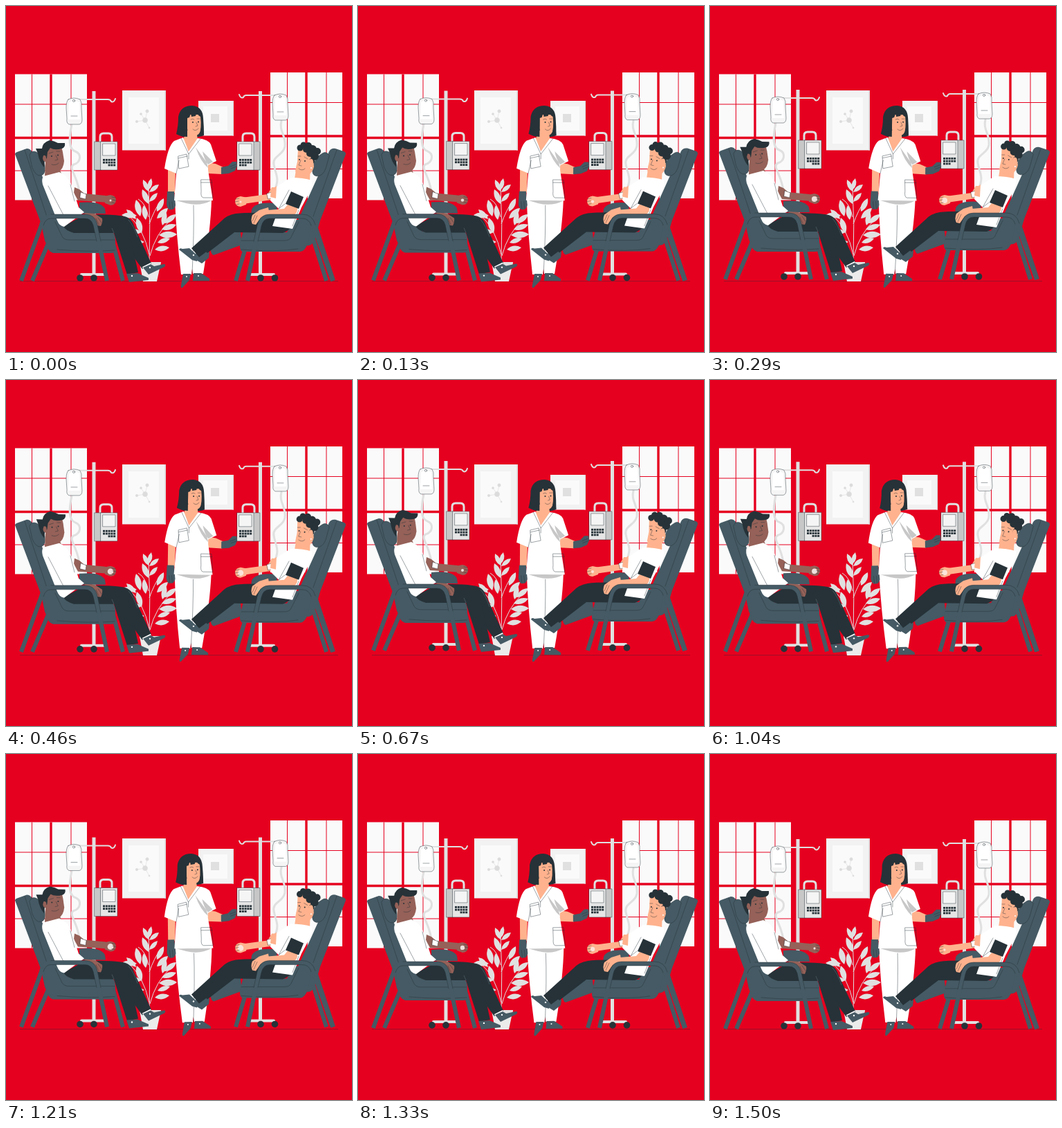
An HTML page that plays this animation: 500x500 px, repeating every 1540 ms.

```html
<!DOCTYPE html>
<html lang="en">
<head>
<meta charset="utf-8">
<title>Donation room</title>
<style>
html,body{margin:0;width:100%;height:100%;overflow:hidden;background:#e6001f}
svg{display:block;width:100%;height:100%}
.o{stroke:#263238;stroke-width:.45;stroke-linejoin:round;stroke-linecap:round}
.n{fill:none}
.w{fill:#fff}
.d{fill:#263238}
.c{fill:#455a64}
.s{fill:#ffb28d}
.b{fill:#956158}
.g{fill:#e0e0e0}
.leg{fill:none;stroke:#455a64;stroke-width:6;stroke-linejoin:round}
.pole{fill:none;stroke:#e0e0e0;stroke-linecap:round}
.post{fill:none;stroke:#e0e0e0;stroke-width:5}
</style>
</head>
<body>
<svg viewBox="0 0 500 500" xmlns="http://www.w3.org/2000/svg">
<rect width="500" height="500" fill="#e6001f"/>
<path d="M20 397.700H480" stroke="#263238" stroke-width=".4"/>
<defs>
  <g id="window">
    <rect width="104" height="182" fill="#fafafa"/>
    <path d="M52 0V182M0 92H104" stroke="#e6001f" stroke-width="3.400"/>
    <path d="M24.500 0V182M81 0V182M0 43.500H104M0 139.500H104" stroke="#e6001f"/>
  </g>
  <g id="bag">
    <path class="o" fill="#f5f5f5" d="M90 135Q98 131 107 135Q110 139 109 147L110 164Q110 170 106 171H91Q87 169 88 163L87 147Q87 138 90 135Z"/>
    <path class="w" d="M91 139Q98 135 106 139L107 164H90Z"/>
    <circle class="o n" cx="98" cy="137" r="1.600"/>
    <path class="o n" d="M94 159H103"/>
  </g>
</defs>

<use href="#window" x="13" y="98.500"/>
<use href="#window" x="382" y="96"/>

<g>
  <rect x="168" y="122" width="63" height="86.500" fill="#f2f2f2"/>
  <path d="M229 122H231V208.500H229Z" class="g"/>
  <rect x="177" y="132" width="44" height="67" fill="#fafafa"/>
  <g fill="#dcdcdc" stroke="#dcdcdc" stroke-width=".6">
    <path d="M201 165L204 152M201 165L195 156M201 165L189 167M201 165L207 176"/>
    <circle cx="201" cy="165" r="3.500"/><circle cx="204" cy="152" r="2.200"/>
    <circle cx="195" cy="156" r="1.500"/><circle cx="189" cy="167" r="1.700"/><circle cx="207" cy="176" r="1"/>
  </g>
  <rect x="278" y="137" width="51" height="50.500" fill="#f2f2f2"/>
  <path d="M327.500 137H329V187.500H327.500Z" class="g"/>
  <rect x="285" y="145" width="35" height="35" fill="#fafafa"/>
  <rect x="296" y="156" width="12" height="12" class="g"/>
</g>

<g class="bob">
  <path class="post" d="M127 123V388"/>
  <path class="pole" stroke-width="2" d="M100 135H147Q151 135 152 138Q156 140 158 134"/>
  <path class="pole" stroke-width="4" d="M109 388H143"/>
  <circle class="d" cx="107" cy="393" r="4.800"/><circle class="d" cx="127" cy="393" r="4.800"/>
  <path class="pole" stroke-width="3" d="M95 171C91 191 90 207 100 210C110 214 108 226 98 229C88 233 107 250 106 274"/>
  <use href="#bag"/>
  <path class="pole" stroke-width="3" d="M136 197V189Q136 184 141 184H148Q153 184 153 189V197"/>
  <path class="o" fill="#c7c7c7" d="M128 196H138V237H128Z"/>
  <path class="o" fill="#e6e6e6" d="M137 196H161V237H137Z"/>
  <path class="o" fill="#f5f5f5" d="M140 199H158V216H140Z"/>
  <g class="keys" data-x="140"></g>
</g>

<g class="bob">
  <path class="post" d="M367.500 123V388"/>
  <path class="pole" stroke-width="2" d="M396 129H347Q344 129 343 132Q339 134 337 128"/>
  <path class="pole" stroke-width="4" d="M352 388H387"/>
  <circle class="d" cx="368" cy="393" r="4.800"/><circle class="d" cx="388.500" cy="393" r="4.800"/>
  <path class="pole" stroke-width="3" d="M398 166C394 181 405 187 403 203C401 216 385 216 387 229C389 243 397 249 387 268"/>
  <use href="#bag" x="298" y="-6"/>
  <path class="pole" stroke-width="3" d="M342 197V189Q342 184 347 184H354Q359 184 359 189V197"/>
  <path class="o" fill="#c7c7c7" d="M357 196H367V237H357Z"/>
  <path class="o" fill="#e6e6e6" d="M334 196H358V237H334Z"/>
  <path class="o" fill="#f5f5f5" d="M337 199H355V216H337Z"/>
  <g class="keys" data-x="337"></g>
</g>

<g id="plant"></g>
<path fill="#ebebeb" d="M193 370H224L218 398H198Z"/>
<path class="g" d="M193 370H224L223 375H194Z"/>

<g id="nurse">
  <path class="w" d="M244 280H297Q296 320 285 387H270L269 380L268 388H253Q246 330 244 280Z"/>
  <path d="M246 281H297Q281 290 260 285Z" fill="#c7c7c7"/>
  <path class="o n" d="M271 288Q272 325 269 387"/>
  <path class="s" d="M234 236H245L244 270H234Z"/>
  <path class="c" d="M233 268H243L245 288Q243 295 239 294Q234 296 232 287Z"/>
  <path class="o n" d="M236 283L237 293M240 283L241 293"/>
  <path class="s" d="M290 226L303 228L314 233L312 243L292 242Z"/>
  <path class="c" d="M311 233L321 231L327 225L333 225L334 231L331 238L322 242L311 243Z"/>
  <path class="o n" d="M324 232L332 229M325 235L333 232"/>
  <path class="d" d="M249 160Q252 144 269 144Q284 145 285 162Q286 173 286 187Q280 190 263 190Q253 189 246 185Q249 174 249 160Z"/>
  <path class="s" d="M261 180H275L277 193L265 212L256 193Z"/>
  <path class="s" d="M262 157H281Q284 167 282 177Q280 188 271 188Q261 187 262 172Z"/>
  <path class="d" d="M252 165Q252 147 267 146Q284 147 284 162L286 187L279 188Q283 176 281 160L278 158L276 150L274 159L268 160L267 155L265 161L262 162V189Q252 189 248 184Z"/>
  <circle class="d" cx="270" cy="168" r="1"/><circle class="d" cx="278" cy="167.500" r="1"/>
  <path class="o n" d="M267 164Q270 162 272 164M276 163L280 163M275 168L277 173L274 174M270 178Q274 182 278 177"/>
  <path class="w" d="M256 190L264 210L277 191Q293 193 296 200L304 224L292 230L292 237L299 281H243L246 242L229 235Q234 202 243 195Z"/>
  <path fill="#c7c7c7" d="M274 204L290 226L292 234Q281 225 274 204ZM284 210L299 225L292 229Q286 221 284 210Z"/>
  <path class="o n" d="M253 191L264 214L281 192M264 214V221M246 242L250 223M249 217L261 214L264 232L250 235ZM249 220L262 217M282 251H297L299 277H285Q281 276 282 268ZM282 255H298"/>
  <path class="c" d="M256 387H267L265 396L255 407Q252 408 253 403Z"/>
  <path class="c" d="M271 386H282L294 394V397H270Z"/>
  <circle class="w" cx="261" cy="391" r="1"/><circle class="w" cx="278" cy="390" r="1"/>
</g>

<g class="bob">
  <path class="leg" d="M61 343L38 397M154 340L169 397"/>
  <path class="c" d="M13 214Q13 212 16 211L30 206Q35 206 38 211L87 330L66 345Q59 347 56 339L51 315Z"/>
  <path class="o n" d="M27 208L59 304"/>
  <path class="b" d="M99 262L106 265L113 271L144 274L148 284L104 281L98 270Z"/>
  <path class="w o" d="M108 269L116 272L115 279L107 277Z"/>
  <g class="ball" data-x="152" data-y="281"></g>
  <path class="c" d="M106 284Q137 281 143 293L144 300H106Z"/>
  <path class="c o" d="M34 215Q37 208 44 211Q52 214 56 230Q58 244 50 245Q43 246 38 234Z"/>
  <path class="b" d="M57 226L75 230L80 242L64 252L56 246Z"/>
  <g class="tilt" data-a="2" data-x="66" data-y="240">
    <path class="b" d="M56 209Q67 200 80 203L82 211L84 224Q83 236 76 239Q67 241 60 232L55 222Z"/>
    <path class="d" d="M46 213L43 206L52 206Q53 197 63 194Q70 195 75 198L85 198Q86 204 81 206Q70 209 64 205L60 211L59 220L56 222L55 233Q48 225 46 213Z"/>
    <path class="b" d="M54 216Q59 214 58 224Q54 226 53 220Z"/>
    <circle class="d" cx="66" cy="217" r="1"/><circle class="d" cx="75" cy="215.500" r="1"/>
    <path class="o n" d="M62 213L68 211M73 210L78 210M72 216L75 222L71 223M66 229Q72 231 76 227"/>
  </g>
  <path class="c" d="M54 308H82L93 326L154 327Q158 329 158 340V353Q157 357 152 357H68Q60 355 57 340Z"/>
  <path class="o n" d="M71 312L81 333Q84 338 91 338H157M157 353Q120 356 74 352"/>
  <path class="d" d="M106 302Q145 300 165 303Q181 304 185 318L210 372L197 380L157 325L99 325Z"/>
  <path class="d" d="M83 318L116 301L154 304Q171 306 177 322L191 385L175 388L156 328L98 328Q85 324 83 318Z"/>
  <path class="n" stroke="#65747a" stroke-width=".5" d="M156 328L153 321M177 309Q185 318 190 334"/>
  <path class="w" d="M197 377L209 371L210 374L198 380Z"/>
  <path class="c" d="M174 387L190 386L206 393V396L178 399Z"/>
  <path class="c" d="M198 378L209 373L214 376L228 373Q232 373 229 377L206 388Z"/>
  <circle class="w" cx="182" cy="390" r="1.200"/><circle class="w" cx="208" cy="378" r="1.200"/>
  <path class="w" d="M54 246L77 240Q91 246 95 260L105 291L113 298L84 319Q77 318 74 310L53 258Q51 250 54 246Z"/>
  <path class="o n" d="M61 260L83 302L115 302M93 258L99 282"/>
  <path class="b" d="M113 299L128 300L139 307Q140 312 137 318L131 317L127 309L117 305Z"/>
  <path class="o n" d="M130 307L134 316M133 306L138 313"/>
  <path class="leg" d="M22 397L51 317Q54 304 65 304H114Q126 304 129 316L146 397"/>
  <path class="o n" d="M54 317Q57 307 65 307H114Q123 307 126 317L131 340M65 301H114Q129 301 132 316L137 340"/>
</g>

<g class="bob">
  <path class="leg" d="M349 340L332 397M438 318L463 397M447 318L473 397"/>
  <path class="c" d="M491 214Q491 211 488 210L476 206Q470 205 467 210L417 321L435 346Q443 348 447 334L454 310Z"/>
  <path class="o n" d="M478 208L444 304"/>
  <path class="c" d="M338 320L296 349Q295 358 300 360L341 345Z"/>
  <path class="s" d="M384 262L393 262L391 279L343 286L341 277L378 272Z"/>
  <path class="w o" d="M377 271L384 269L386 277L379 279Z"/>
  <g class="ball" data-x="338" data-y="283"></g>
  <path class="c" d="M391 285Q360 282 355 294L354 302H392Z"/>
  <path class="c o" d="M467 216Q463 209 457 213Q447 218 443 233Q441 245 449 246Q458 246 462 235Z"/>
  <path class="s" d="M420 230L440 229L439 253L417 250Z"/>
  <g class="tilt" data-a="-2" data-x="432" data-y="242">
    <path class="s" d="M422 207Q435 201 443 214L445 232Q442 245 430 246Q420 246 418 238L421 225Z"/>
    <g class="d">
      <circle cx="425" cy="205" r="4.500"/><circle cx="430" cy="201" r="4.500"/><circle cx="437" cy="202" r="5"/>
      <circle cx="443" cy="207" r="6"/><circle cx="450" cy="210" r="5"/><circle cx="446" cy="217" r="6"/>
      <circle cx="442" cy="224" r="4"/><circle cx="434" cy="207" r="5"/><circle cx="439" cy="213" r="5"/>
    </g>
    <path class="s" d="M438 222Q445 218 444 229Q440 234 437 230Z"/>
    <circle class="d" cx="424" cy="222" r="1"/><circle class="d" cx="432" cy="224" r="1"/>
    <path class="o n" d="M422 217L426 217M431 218L436 221M426 223L423 230L427 231M423 235Q428 239 432 235"/>
    <circle class="w" cx="441" cy="234" r="1"/>
  </g>
  <path class="c" d="M343 325L406 327L415 309H442L437 341Q432 355 425 355H341Q336 351 339 340Z"/>
  <path class="o n" d="M423 312L412 334Q410 339 402 339H340M340 352Q391 356 422 351"/>
  <path class="c" d="M280 350L294 356L293 364L283 372L270 364Z"/>
  <path class="d" d="M388 299Q347 298 332 300Q319 302 311 311L268 350L279 363L330 325L397 325Z"/>
  <path class="d" d="M413 318L377 300Q343 297 327 308L281 347L291 357L330 327L400 328Q410 324 413 318Z"/>
  <path class="c" d="M265 350L278 362L276 369L269 367L250 352Q251 349 255 351Z"/>
  <circle class="w" cx="271" cy="360" r="1.200"/>
  <path class="w" d="M411 248Q430 248 442 252Q444 259 436 274L427 291L414 322L385 318L394 293L382 281L384 266Z"/>
  <path class="s" d="M383 266L391 260L390 278L382 276Z"/>
  <path class="o n" d="M409 266L394 293L403 286M423 295L414 318"/>
  <path class="s" d="M407 287L421 291Q422 300 414 303L377 303L367 296L402 293Z"/>
  <path class="s" d="M379 291L366 295L356 302Q353 309 356 315L361 316L368 306L381 303Z"/>
  <path class="o n" d="M363 303L358 314M360 302L356 311"/>
  <path class="d" d="M412 268L430 276L423 293L404 286Z"/>
  <path class="leg" d="M349 397L366 318Q369 304 381 304H428Q440 304 444 317L472 397"/>
  <path class="o n" d="M364 340L369 318Q372 307 381 307H428Q438 307 441 317M358 340L363 317Q367 301 381 301H428Q443 301 447 316"/>
</g>
</svg>
<script>
const LOOP = 1540, STEPS = 37;
const all = q => [...document.querySelectorAll(q)];
const byId = id => document.getElementById(id);

// Keypads, the last row shorter on the outer side
for (const pad of all('.keys')) {
  const x0 = +pad.dataset.x, skip = x0 < 200 ? [10, 11] : [13, 14];
  let keys = '';
  for (let i = 0; i < 15; i++) {
    if (skip.includes(i)) continue;
    keys += `<rect x="${x0 + (i % 5) * 3.8}" y="${221 + Math.floor(i / 5) * 3.8}" width="3" height="2.800" class="d"/>`;
  }
  pad.innerHTML = keys;
}

// Leaves as base and tip points
const leaf = ([x, y, u, v]) => {
  const nx = (v - y) * .36, ny = (x - u) * .36, mx = (x + u) / 2, my = (y + v) / 2;
  return `<path class="g" d="M${x} ${y}Q${mx + nx} ${my + ny} ${u} ${v}Q${mx - nx} ${my - ny} ${x} ${y}Z"/>`;
};
const stems = 'M207 370Q209 315 206 262M207 359Q199 322 177 302M206 305Q202 285 191 279M208 361Q216 329 239 308M207 315Q214 295 224 281';
byId('plant').innerHTML = `<path d="${stems}" class="n" stroke="#e0e0e0"/>` + [
  [206, 268, 198, 251], [206, 286, 197, 265], [202, 309, 199, 288],
  [194, 304, 188, 280], [188, 308, 174, 294], [189, 303, 167, 302],
  [196, 327, 174, 325], [196, 328, 189, 306], [200, 341, 180, 341],
  [206, 266, 210, 249], [207, 269, 221, 258], [207, 283, 219, 270],
  [218, 297, 228, 278], [218, 307, 234, 292], [226, 317, 231, 297],
  [229, 314, 246, 301], [225, 323, 246, 316], [221, 331, 247, 330],
  [219, 342, 237, 336], [215, 352, 236, 349]
].map(leaf).join('');

// Hands squeezing a ball
const hands = all('.ball').map(g => {
  const { x, y } = g.dataset, left = x < 200;
  g.setAttribute('transform', `translate(${x} ${y})${left ? '' : ' scale(-1 1)'}`);
  g.innerHTML = `<path class="${left ? 'b' : 's'}" d="M-11 -6L-1 -8Q7 -7 7 0Q6 7 -1 7L-9 4Z"/>
    <circle fill="${left ? '#eee0dc' : '#fbe4da'}" cx="-1"/>
    <path class="o n" d="M1 -5L6 -4M2 -1L7 0M1 3L5 4"/>`;
  return g.querySelector('circle');
});
const bobs = all('.bob'), tilts = all('.tilt');

function draw(ms) {
  const p = Math.floor((ms % LOOP) / LOOP * STEPS + .1) / STEPS;
  const angle = p * 2 * Math.PI;
  const lift = (1 - Math.cos(angle)) / 2, sway = Math.sin(angle);
  for (const g of bobs) g.setAttribute('transform', `translate(0 ${-6.4 * lift})`);
  for (const g of tilts) {
    const { a, x, y } = g.dataset;
    g.setAttribute('transform', `rotate(${a * lift} ${x} ${y})`);
  }
  byId('nurse').setAttribute('transform', `rotate(${.8 * sway} 268 250)`);
  for (const c of hands) c.setAttribute('r', 1.5 + 3 * sway * sway);
}

const start = performance.now();
function tick() {
  draw(performance.now() - start);
  requestAnimationFrame(tick);
}
draw(0);
requestAnimationFrame(tick);
</script>
</body>
</html>
```
